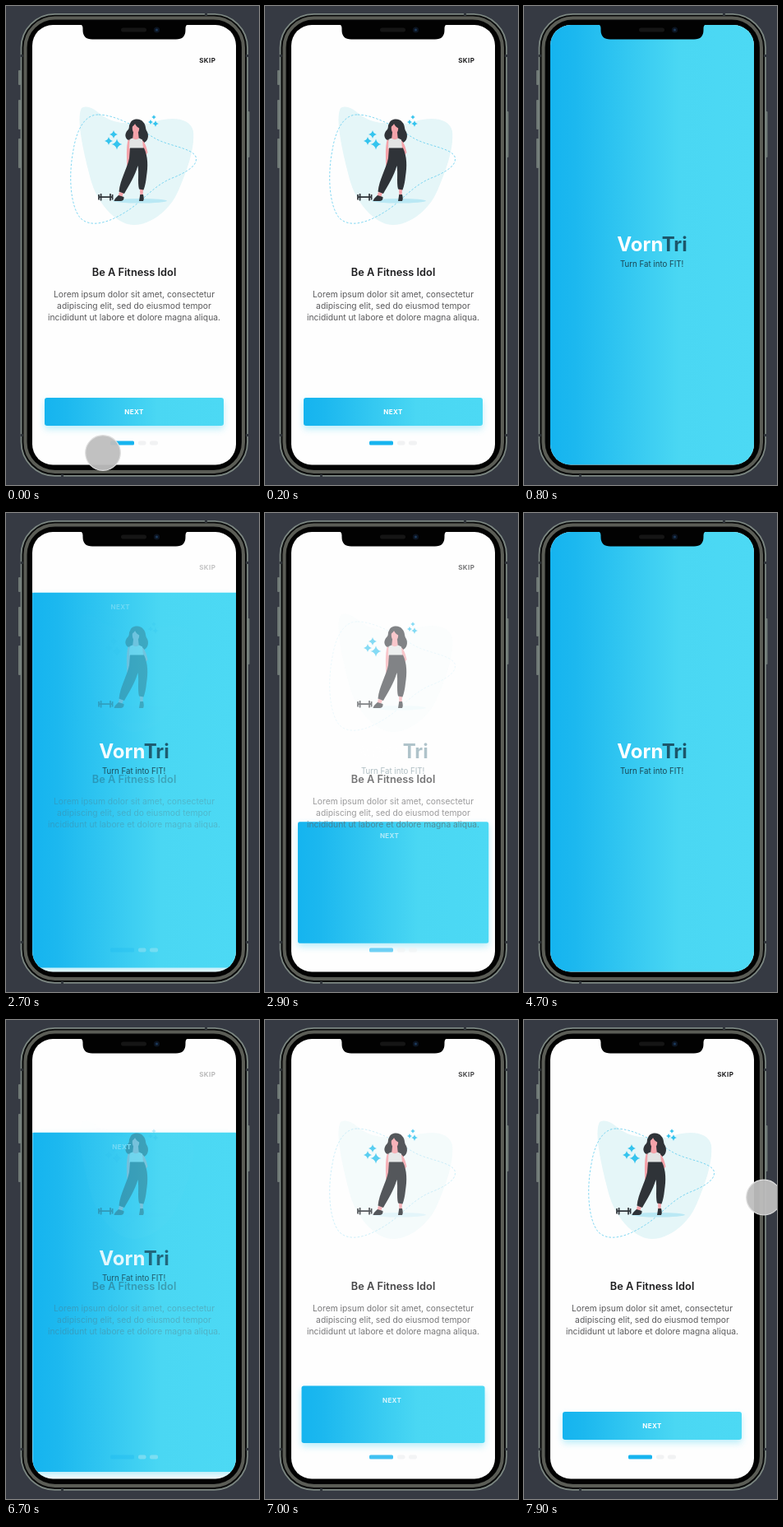
An HTML page for the animation above (8000 ms loop, 308 by 582 pixels).

```html
<!DOCTYPE html>
<html lang="en">
<head>
<meta charset="utf-8">
<title>Fitness onboarding</title>
<style>
html, body { margin: 0; width: 100%; height: 100%; overflow: hidden; background: #363a43; }
svg { display: block; width: 100vw; height: 100vh; }
text { font-family: Inter, "Open Sans", sans-serif; text-anchor: middle; }
.bold { font-weight: 700; }
.copy { font-size: 10.3px; fill: #5a5a5c; }
</style>
</head>
<body>
<svg viewBox="0 0 308 582">
  <defs>
    <linearGradient id="sky">
      <stop offset="0" stop-color="#15b4ef"/>
      <stop offset=".12" stop-color="#1cb8ef"/>
      <stop offset=".63" stop-color="#4ad7f3"/>
      <stop offset="1" stop-color="#4cd9f4"/>
    </linearGradient>
    <filter id="soft" x="-20%" y="-60%" width="140%" height="220%"><feGaussianBlur stdDeviation="4"/></filter>
    <filter id="sheen"><feGaussianBlur stdDeviation=".7"/></filter>
    <clipPath id="glass"><rect x="32" y="23" width="248" height="534.5" rx="25"/></clipPath>
    <path id="star" d="M0-1Q.18-.18 1 0Q.18.18 0 1Q-.18.18-1 0Q-.18-.18 0-1Z" fill="#35c4ee"/>
  </defs>

  <!-- phone body -->
  <g fill="#6f7976">
    <rect x="15" y="78" width="3" height="18" rx="1"/>
    <rect x="15" y="114" width="3" height="36" rx="1"/>
    <rect x="15" y="161" width="3" height="36" rx="1"/>
    <rect x="293.5" y="128" width="3" height="56" rx="1"/>
  </g>
  <rect x="18.5" y="9.8" width="275.5" height="561" rx="41" fill="#0a0b0b" stroke="#7c8782" stroke-width="1.8"/>
  <rect x="23.5" y="14.5" width="265.5" height="551.5" rx="36" fill="none" stroke="#5b5d56" stroke-width="4" filter="url(#sheen)"/>
  <rect x="26.5" y="17.500" width="259.500" height="545.500" rx="32" fill="#020202"/>
  <g fill="#30353a">
    <rect x="242" y="9" width="3" height="3"/><rect x="67" y="569" width="3" height="3"/>
    <rect x="17.7" y="59" width="3" height="3"/><rect x="292" y="59" width="3" height="3"/>
    <rect x="17.7" y="520" width="3" height="3"/><rect x="292" y="520" width="3" height="3"/>
  </g>

  <g clip-path="url(#glass)">
    <rect x="32" y="23" width="249" height="535" fill="#fefefe"/>
    <rect id="shade" fill="#4cd3f3" opacity=".38" filter="url(#soft)"/>
    <rect id="hero" fill="url(#sky)"/>

    <g id="page">
      <g id="blob">
        <path fill="#e5f6f8" d="M92 124C104 118 112 132 126 138C142 145 158 141 175 143C196 134 224 134 228 152C230 172 222 196 210 224C200 248 176 266 156 266C134 266 112 240 104 214C97 188 84 138 92 124Z"/>
        <path fill="none" stroke="#62cdef" stroke-width=".8" stroke-dasharray="2.6 2" d="M112 132C96 132 86 150 82 175C76 205 78 242 90 257C102 270 124 264 146 250C166 238 180 217 205 208C224 200 234 192 231 183C226 172 196 170 180 160C160 148 134 132 112 132Z"/>
        <ellipse cx="163" cy="236.8" rx="33" ry="2.8" fill="#b9e8f4"/>
      </g>
      <g id="stars"></g>
      <!-- figure -->
      <path fill="#2f3338" d="M151 143C153 136 164 136 167 141C171 145 169 149 172 153C175 160 171 167 164 167L151 164C143 161 145 154 148 151C151 148 149 146 151 143Z"/>
      <g fill="#f4a3aa">
        <path d="M148.5 163C151 161 152 167 151.4 173C151 181 151 188 150 195L147.3 194C147 184 146.3 171 148.5 163Z"/>
        <path d="M165.5 163C169 165 171 171 172.5 178L168 184L166 182L169 178L165 171Z"/>
        <path d="M155 154H161L162 163H154Z"/>
        <ellipse cx="158" cy="149" rx="4.2" ry="6.3"/>
        <path d="M138 226L143 227L141 233L136 233ZM163 222H167L166.5 232H163.5Z"/>
      </g>
      <path fill="#2f3338" d="M153 146C155 139 163 139 164 149C160 148 158 145 157 143C156 145 155 146 153 146Z"/>
      <path fill="#e2e4e4" d="M150.5 162L154 160.5Q158 164 162 160.5L166 162.5L167 173H150Z"/>
      <path fill="#2f3338" d="M151 172.5H168C173 183 173 195 171 207Q170 217 167.5 223.5L162 222.5C160 214 162 202 160.5 194C157 207 149 219 144 228L137.5 225.5C139 211 148 196 150 185Z"/>
      <path fill="#2f3338" d="M137 230L143.5 232Q144 236.5 140 237H131.5Q132 234 137 230ZM163.3 229H167Q168.5 234 167 237H162Z"/>
      <path stroke="#2f3338" stroke-width="1.7" d="M113 229V235.5M115.6 228V236.5M127 228V236.5M129.6 229V235.5M113 232.2H130"/>

      <text class="bold" x="245.3" y="68.5" font-size="8" letter-spacing=".45" fill="#1d1d1f">SKIP</text>
      <text x="156" y="327.5" font-size="12.8" font-weight="600" fill="#1d1d1f">Be A Fitness Idol</text>
      <text class="copy" x="156" y="353.5">Lorem ipsum dolor sit amet, consectetur</text>
      <text class="copy" x="156" y="368">adipiscing elit, sed do eiusmod tempor</text>
      <text class="copy" x="156" y="382.3">incididunt ut labore et dolore magna aliqua.</text>
      <rect x="127" y="528.5" width="29" height="5" rx="1.5" fill="#16b4ef"/>
      <rect x="161" y="528.5" width="9.5" height="5" rx="2" fill="#f1f2f3"/>
      <rect x="175" y="528.5" width="10" height="5" rx="2" fill="#f1f2f3"/>
      <text id="next" class="bold" font-size="8" letter-spacing=".35" fill="#fff">NEXT</text>
    </g>

    <g id="brand">
      <text class="bold" x="156" y="298" font-size="24" fill="#fff">Vorn<tspan fill="#1c566a">Tri</tspan></text>
      <text x="155.7" y="317.3" font-size="9.7" fill="#1a4654">Turn Fat into FIT!</text>
    </g>
  </g>

  <!-- notch -->
  <path fill="#020202" d="M90 22H222Q218.500 23 218.500 27V29Q218.500 40.500 207 40.500H105Q93.500 40.500 93.500 29V27Q93.500 23 90 22Z"/>
  <rect x="140" y="26.5" width="31" height="5" rx="2.5" fill="#151515"/>
  <circle cx="183.5" cy="29" r="3.6" fill="#0c1420"/>
  <circle cx="183.5" cy="29" r="1.5" fill="#1c3a5c"/>

  <circle id="touch" r="21.3" fill="#bebebe" fill-opacity=".95" stroke="#dedede" stroke-width="1.2"/>
</svg>
<script>
const LOOP = 8000, STEP = 100, FLIGHT = 700;
const $ = id => document.getElementById(id);
const clamp = v => Math.max(0, Math.min(1, v));
const mix = (a, b, k) => a + (b - a) * k;

function set(id, attrs) {
  for (const key in attrs) $(id).setAttribute(key, attrs[key]);
}

// cubic-bezier(.4, 0, .2, 1)
function ease(x) {
  let lo = 0, hi = 1;
  for (let i = 0; i < 24; i++) {
    const s = (lo + hi) / 2, r = 1 - s;
    if (1.2 * r * r * s + 0.6 * r * s * s + s * s * s < x) lo = s; else hi = s;
  }
  return lo * lo * (3 - 2 * lo);
}

$("stars").innerHTML = [
  [131, 156, 5], [125, 164, 5], [135, 168, 6.5],
  [180, 135, 2.8], [176, 141, 3], [182, 143, 4]
].map(([x, y, r]) => `<use href="#star" transform="translate(${x} ${y}) scale(${r})"/>`).join("");

// 0 is the splash screen, 1 the finished onboarding page
function flightAt(ms) {
  if (ms < 700) return 1;
  if (ms < 2700) return 0;
  if (ms < 4700) return clamp(0.216 + (ms - 2700) / FLIGHT);
  if (ms < 6700) return 0;
  return clamp(0.256 + (ms - 6700) / FLIGHT);
}

function touchAt(ms) {
  if (ms < 100) return [118, 543];
  if (ms < 200) return [127, 557];
  return ms >= 7900 ? [292, 215.5] : null;
}

function draw(ms) {
  const t = flightAt(ms), p = ease(t);
  const side = Math.pow(p, 2.5);
  const left = mix(32, 47, side), right = mix(280.5, 265, side);
  const top = mix(23, 476, p), bottom = mix(557.5, 510, Math.pow(p, 1.25));
  const box = { x: left, width: right - left, height: bottom - top, rx: 3 * p };

  set("hero", { ...box, y: top });
  set("shade", { ...box, y: top + 4 });
  set("page", { opacity: clamp(1.2 * t) });
  set("blob", { opacity: t * t });
  set("next", { x: 156 - 20 * (1 - p), y: top + 20 });
  set("brand", { opacity: clamp(1.4 - 2.1 * t) });

  const at = touchAt(ms);
  set("touch", at ? { cx: at[0], cy: at[1], visibility: "visible" } : { visibility: "hidden" });
}

const start = performance.now();
function tick() {
  const ms = (performance.now() - start) % LOOP;
  draw(Math.floor(ms / STEP) * STEP);
  requestAnimationFrame(tick);
}
tick();
</script>
</body>
</html>
```
